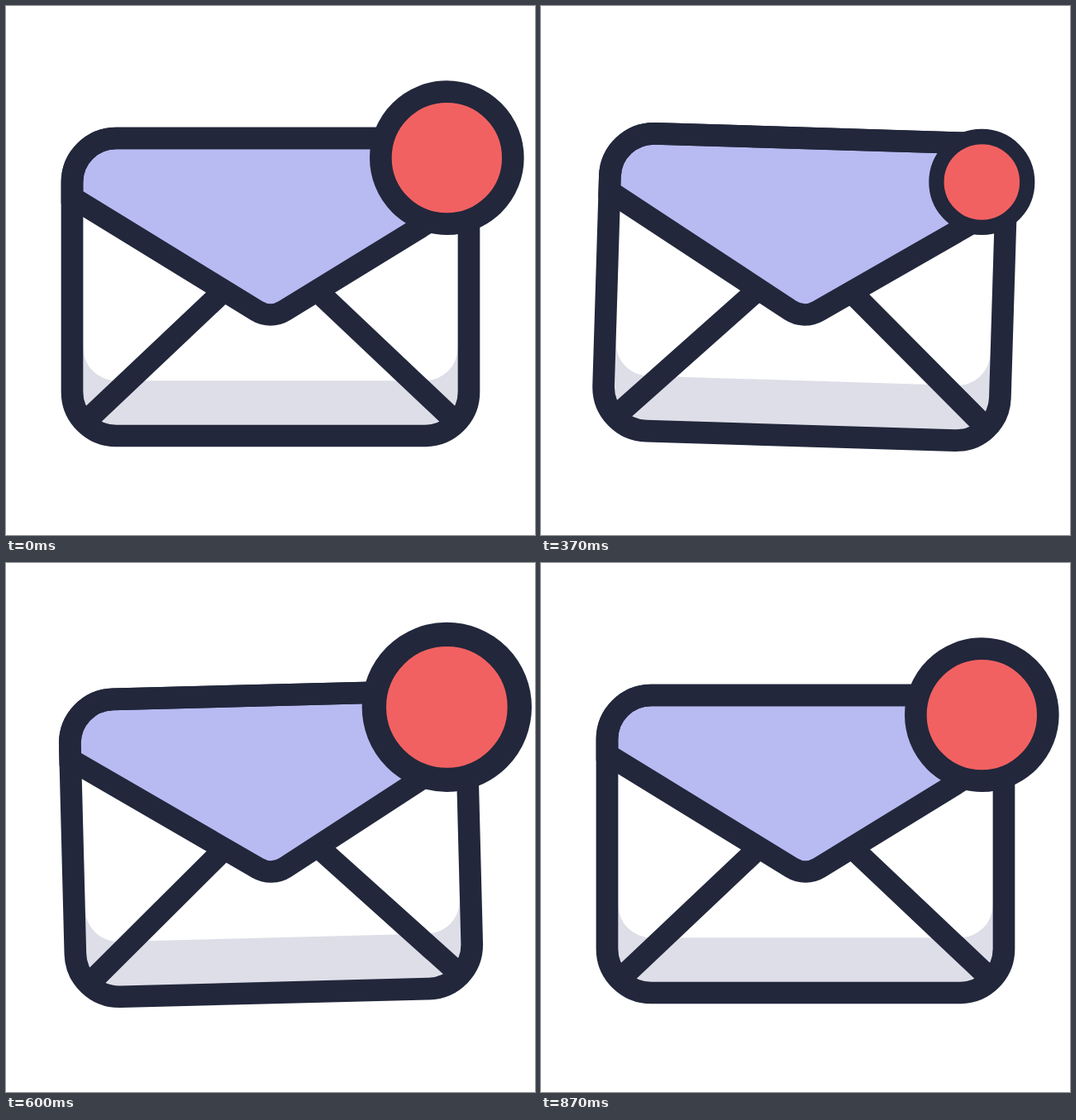
An HTML page for the animation above (1030 ms loop, 640 by 640 pixels).

```html
<!DOCTYPE html>
<html lang="en">
<head>
<meta charset="utf-8">
<title>New mail</title>
<style>
  html, body { margin: 0; height: 100%; overflow: hidden; background: #fff; }
  svg { display: block; width: 100%; height: 100%; }
  .line { stroke: #22273b; stroke-width: 26.67; }
</style>
</head>
<body>
<svg viewBox="0 0 640 640" fill="none">
  <g id="mail">
    <rect x="80" y="160" width="480" height="360" rx="53.33" fill="#dedee8"/>
    <rect x="93.33" y="173.33" width="453.33" height="280" rx="40" fill="#fff"/>
    <path class="line" d="M95.5 503.5 262 346M544.5 503.5 378 346"/>
    <path class="line" fill="#b8bbf2" d="M133.33 160H506.67A53.33 53.33 0 0 1 560 213.33V231.5L336.75 368.7A32 32 0 0 1 303.25 368.7L80 231.5V213.33A53.33 53.33 0 0 1 133.33 160Z"/>
    <rect class="line" x="80" y="160" width="480" height="360" rx="53.33"/>
  </g>
  <g id="badge">
    <circle class="line" cy="-93.33" r="80" fill="#f26161"/>
  </g>
</svg>
<script>
const LOOP = 1030;
const mail = document.getElementById('mail');
const badge = document.getElementById('badge');

// Keys are [pose, value], eased in and out between neighbours.
const tilt = [[7, 0], [12, 5], [17, -5], [22, 0]];
const size = [[5, 1], [10, 0.65], [15, 1.1], [20, 1]];

function valueAt(keys, pose) {
  if (pose <= keys[0][0]) return keys[0][1];
  for (let i = 1; i < keys.length; i++) {
    const [a, from] = keys[i - 1], [b, to] = keys[i];
    if (pose <= b) {
      const p = (pose - a) / (b - a);
      return from + (to - from) * p * p * (3 - 2 * p);
    }
  }
  return keys[keys.length - 1][1];
}

// 25 poses per second, shown on a 30 Hz clock rounded to 10 ms.
function poseAt(ms) {
  const tick = Math.floor((Math.floor(ms / 10) * 10 + 4) * 0.03);
  return Math.floor((5 * tick + 2) / 6);
}

function draw(now) {
  const pose = poseAt(now % LOOP);
  mail.setAttribute('transform', `rotate(${valueAt(tilt, pose)} 320 320)`);
  badge.setAttribute('transform', `translate(533.33 277) scale(${valueAt(size, pose)})`);
  requestAnimationFrame(draw);
}
draw(performance.now());
</script>
</body>
</html>
```
